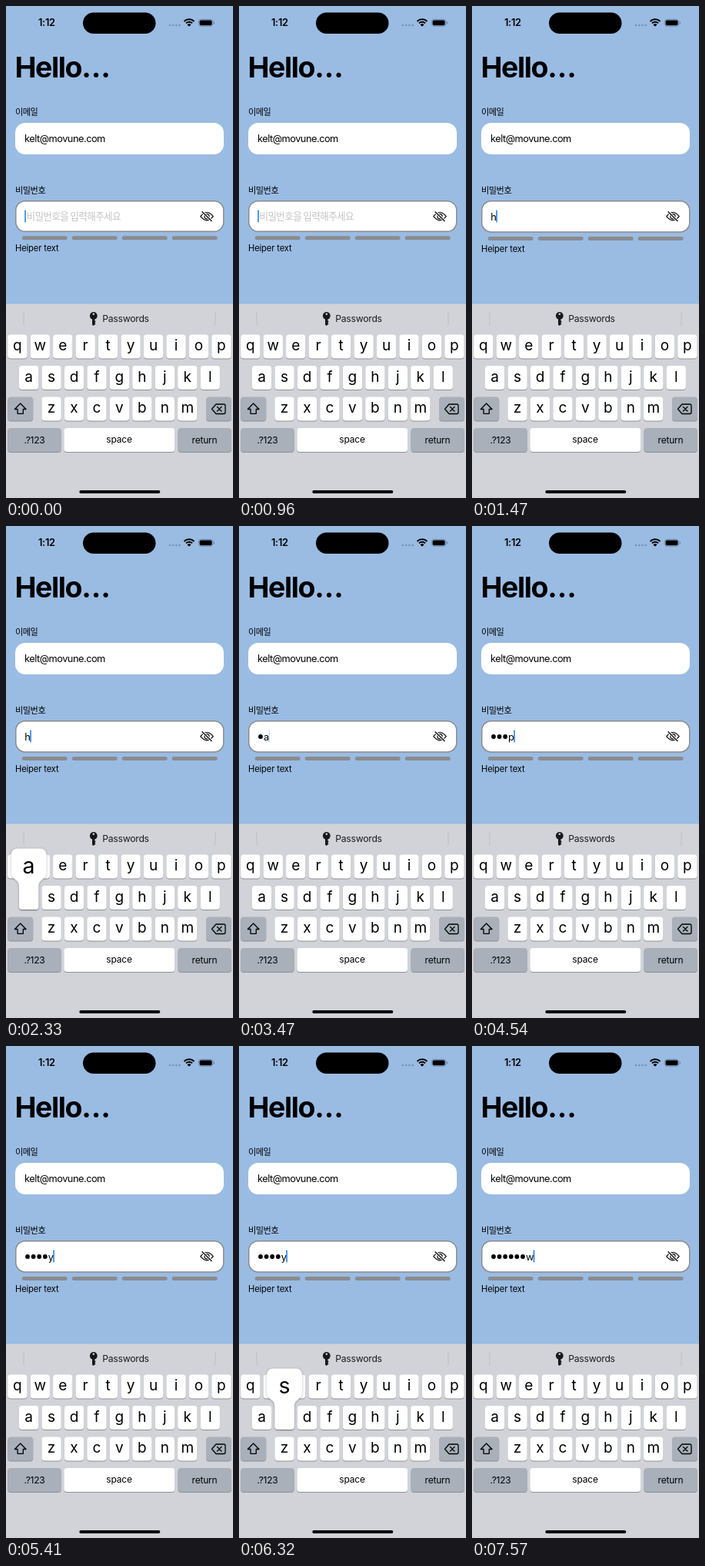
Recreate the animation shown at these times as an HTML page with a canvas. Size 295 by 640 pixels, loop 8 s.

```html
<!DOCTYPE html>
<html lang="ko">
<head>
<meta charset="utf-8">
<title>Password field</title>
<style>
  html, body { margin: 0; width: 100%; height: 100%; overflow: hidden; background: #9abce3; }
  canvas { display: block; width: 295px; height: 640px; }
</style>
</head>
<body>
<canvas id="stage"></canvas>
<script>
const W = 295, H = 640, LOOP = 8000;
const LATIN = 'Inter, "Noto Sans", sans-serif';
const HANGUL = '"Noto Sans CJK KR", "Noto Sans CJK", sans-serif';
const KEYBOARD = '#d1d3d9', DARK_KEY = '#a9b0ba', GRAY = '#8b8b8e', BLUE = '#1479f0';
const ROWS = [['qwertyuiop', 2.2, 427.5], ['asdfghjkl', 17, 468], ['zxcvbnm', 46.4, 508.5]];
const PITCH = 29.45, KEY_W = 25.3, KEY_H = 31;

// start time, typed text, caret opacity, pressed key
const STEPS = [
  [0, '', 1], [190, '', .6], [310, '', .25], [450, '', 0], [670, '', .5], [960, '', 1],
  [1330, '', .4, 'h'], [1470, 'h', 1], [2330, 'h', 1, 'a'], [2580, 'ha', 1],
  [3350, 'ha', .6], [3470, 'ha', .25], [3600, 'ha', 1, 'p'], [3850, 'hap', 1],
  [4010, 'hap', 1, 'p'], [4540, 'happ', 1], [5040, 'happ', 1, 'y'], [5160, 'happ', 1],
  [5300, 'happy', .5], [5410, 'happy', 1], [6320, 'happy', 1, 's'],
  [6820, 'happys', 1], [7570, 'happysw', 1]
];

const canvas = document.getElementById('stage');
const ctx = canvas.getContext('2d');
const dpr = window.devicePixelRatio || 1;
canvas.width = W * dpr;
canvas.height = H * dpr;

function box(x, y, w, h, r, fill) {
  ctx.beginPath();
  ctx.roundRect(x, y, w, h, r);
  ctx.fillStyle = fill;
  ctx.fill();
}

function disc(x, y, r, fill) {
  ctx.beginPath();
  ctx.arc(x, y, r, 0, 7);
  ctx.fillStyle = fill;
  ctx.fill();
}

function line(path, width, color = '#000') {
  ctx.lineWidth = width;
  ctx.strokeStyle = color;
  ctx.lineCap = ctx.lineJoin = 'round';
  ctx.stroke(new Path2D(path));
}

function text(str, x, y, size, { weight = 400, font = LATIN, color = '#000', align = 'left', gap = 0 } = {}) {
  ctx.font = `${weight} ${size}px ${font}`;
  ctx.letterSpacing = gap + 'px';
  ctx.textAlign = align;
  ctx.fillStyle = color;
  ctx.fillText(str, x, y);
  return ctx.measureText(str).width;
}

function statusBar() {
  text('1:12', 42, 26.3, 12.8, { weight: 600, gap: -.3 });
  box(100, 8.5, 94.5, 27.5, 13.75, '#000');
  for (let i = 0; i < 4; i++) disc(213 + i * 4.2, 25, 1.3, '#7890b4');
  for (const r of [9.2, 5.8]) {
    ctx.beginPath();
    ctx.arc(238, 26.5, r, -Math.PI * .75, -Math.PI * .25);
    ctx.lineWidth = 2;
    ctx.lineCap = 'butt';
    ctx.strokeStyle = '#000';
    ctx.stroke();
  }
  ctx.beginPath();
  ctx.moveTo(238, 26.8);
  ctx.arc(238, 26.8, 3.6, -Math.PI * .75, -Math.PI * .25);
  ctx.fillStyle = '#000';
  ctx.fill();
  ctx.beginPath();
  ctx.roundRect(250.4, 17.4, 18.4, 9, 2.8);
  ctx.lineWidth = .8;
  ctx.strokeStyle = '#6484ab';
  ctx.stroke();
  box(251.6, 18.6, 16, 6.6, 1.7, '#000');
  box(269.7, 20.3, 1.2, 3.2, .6, '#6484ab');
}

function eye(x, y) {
  line(`M${x - 8.2} ${y} Q${x} ${y - 10.4} ${x + 8.2} ${y} Q${x} ${y + 10.4} ${x - 8.2} ${y} Z`, 1.2);
  ctx.beginPath();
  ctx.arc(x, y, 3.1, 0, 7);
  ctx.lineWidth = 1.2;
  ctx.stroke();
  const slash = `M${x - 6} ${y - 6} L${x + 6.2} ${y + 6}`;
  line(slash, 3.2, '#fff');
  line(slash, 1.2);
}

function form(typed, caret) {
  const drop = typed ? .7 : 0;
  const label = { font: HANGUL, gap: -.5 };
  text('Hello…', 11.5, 93, 37.5, { weight: 700, gap: -1.4 });
  text('이메일', 12, 142, 11.2, label);
  box(12, 152, 271, 41, 13, '#fff');
  text('kelt@movune.com', 24, 177.2, 12.8, { gap: -.5 });
  text('비밀번호', 12, 243.5, 11.2, label);
  box(12, 253, 271.5, 41 + drop, 13, GRAY);
  box(13.5, 254.5, 268.5, 38 + drop, 11.5, '#fff');
  eye(261, 273.7);
  for (let i = 0; i < 4; i++) box(20.7 + i * 65, 299.3 + drop, 59, 5, 2.5, GRAY);
  text('Heiper text', 12, 319.2 + drop, 11.2, { gap: -.15 });

  let x = 24.3;
  if (typed) {
    for (let i = 1; i < typed.length; i++, x += 7.6) disc(x + 3.7, 274, 2.9, '#000');
    x += text(typed.at(-1), x, 278.5, 12.8, { gap: -.4 }) - .2;
  } else {
    text('비밀번호을 입력해주세요', 26.5, 278, 12.6, { font: HANGUL, color: '#c4c4c6', gap: -.65, weight: 300 });
  }
  ctx.globalAlpha = caret;
  box(x, 265.5, 1.5, 16, .7, BLUE);
  ctx.globalAlpha = 1;
}

function key(x, y, w, fill = '#fff') {
  box(x, y + 1, w, KEY_H, 4, '#8d9096');
  box(x, y, w, KEY_H, 4, fill);
}

function popup(letter, x, y) {
  const left = Math.min(x - 10.4, 293 - 46), right = left + 46, top = y - 48.5;
  const end = x + KEY_W, bottom = y + KEY_H, neck = y - 12;
  ctx.beginPath();
  ctx.moveTo(left + 8, top);
  ctx.arcTo(right, top, right, neck, 8);
  ctx.lineTo(right, neck - 5);
  ctx.bezierCurveTo(right, neck + 4, end, neck + 3, end, neck + 13);
  ctx.arcTo(end, bottom, x, bottom, 4);
  ctx.arcTo(x, bottom, x, neck, 4);
  ctx.lineTo(x, neck + 13);
  ctx.bezierCurveTo(x, neck + 3, left, neck + 4, left, neck - 5);
  ctx.arcTo(left, top, right, top, 8);
  ctx.closePath();
  ctx.save();
  ctx.shadowColor = 'rgba(0,0,0,.3)';
  ctx.shadowBlur = 3 * dpr;
  ctx.shadowOffsetY = .5 * dpr;
  ctx.fillStyle = '#fff';
  ctx.fill();
  ctx.restore();
  text(letter, (left + right) / 2, y - 16, 28.5, { align: 'center' });
}

function passwordsBar() {
  box(22.5, 398, 1, 17.5, 0, '#bdc0c7');
  box(271.5, 398, 1, 17.5, 0, '#bdc0c7');
  disc(113.8, 403, 4.9, '#17181a');
  ctx.fill(new Path2D('M112 405 H115.2 V409 L116.7 410.5 L115.2 412 L116.5 413.4 L113.6 416 L112 414.4 Z'));
  disc(113.8, 400.8, 1.3, KEYBOARD);
  text('Passwords', 125.2, 411.2, 12.2, { color: '#1b1c1e', gap: -.25 });
}

function keyboard(pressed) {
  box(0, 387.5, W, H, 0, KEYBOARD);
  passwordsBar();
  let held;
  for (const [letters, left, y] of ROWS) {
    [...letters].forEach((c, i) => {
      const x = left + i * PITCH;
      key(x, y, KEY_W);
      text(c, x + KEY_W / 2, y + 20.6, 19, { align: 'center' });
      if (c === pressed) held = [c, x, y];
    });
  }
  key(2.2, 508.5, 33, DARK_KEY);
  line('M18.7 517 L26 524.5 H22.3 V530.3 H15.1 V524.5 H11.4 Z', 1.3);
  key(260, 508.5, 33, DARK_KEY);
  line('M273 518 H283 Q285 518 285 520 V528.5 Q285 530.5 283 530.5 H273 L267.5 524.3 Z', 1.3);
  line('M274.5 521.5 L280 527 M280 521.5 L274.5 527', 1.3);

  const mid = { align: 'center', gap: -.2 };
  key(2.2, 549, 69.5, DARK_KEY);
  text('.?123', 37, 569.2, 12, mid);
  key(75.3, 549, 144, '#fff');
  text('space', 147, 568.3, 12, mid);
  key(223.5, 549, 69.5, DARK_KEY);
  text('return', 258, 569.2, 12, mid);
  box(95.3, 630, 105, 4, 2, '#000');
  if (held) popup(...held);
}

function draw(now) {
  const t = now % LOOP;
  const [, typed, caret, pressed] = STEPS.findLast(step => step[0] <= t);
  ctx.setTransform(dpr, 0, 0, dpr, 0, 0);
  box(0, 0, W, H, 0, '#9abce3');
  statusBar();
  form(typed, caret);
  keyboard(pressed);
}

const start = performance.now();
function tick() {
  draw(performance.now() - start);
  requestAnimationFrame(tick);
}
tick();
</script>
</body>
</html>
```
